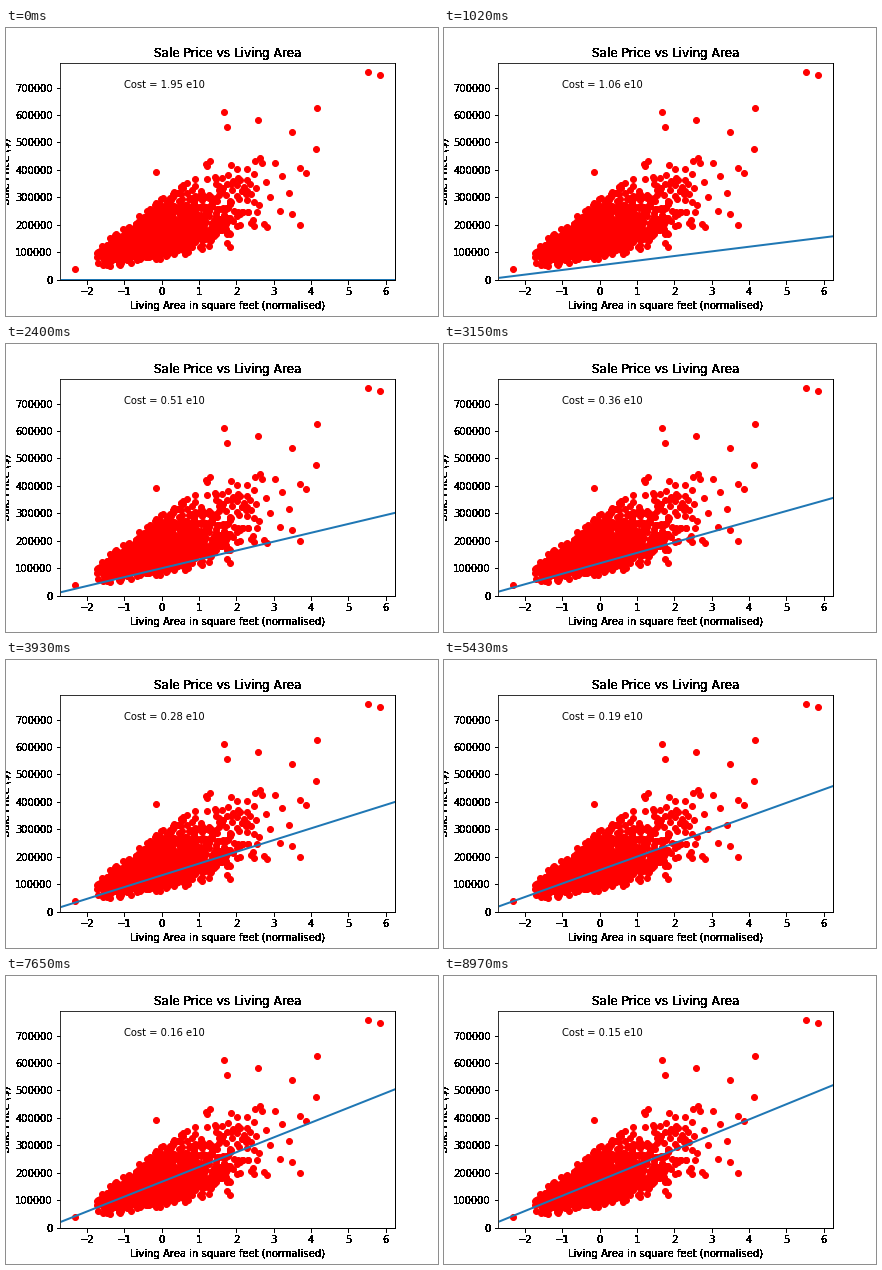
Animation, 432 px wide and 288 px high, one loop 9 s. Source, as a matplotlib script:

```python
import numpy as np
import matplotlib.pyplot as plt
from matplotlib.animation import FuncAnimation

plt.rcParams["font.family"] = "DejaVu Sans"

FRAMES, INTERVAL = 300, 30
RATE = 0.01                                   # gradient descent step
MEAN, SLOPE, SPREAD = 180933, 58430, 79495    # least squares fit of the prices
AREA_MEAN, AREA_STD = 1510.47, 507.88


def padded(low, high, pad=0.05):
    margin = pad * (high - low)
    return low - margin, high + margin


def normalise(area):
    return (area - AREA_MEAN) / AREA_STD


XLIM = padded(normalise(334), normalise(4476))
YLIM = padded(34900, 755000)

# The houses that stand clear of the cloud: normalised area, price
LONERS = [(-2.316, 39e3), (-0.15, 392e3), (1.67, 611e3), (1.75, 556e3),
          (2.58, 582e3), (3.49, 538e3), (3.71, 199e3), (4.14, 476e3),
          (4.16, 625e3), (5.524, 755e3), (5.839, 745e3)]


def houses():
    """A skewed log-normal cloud, a thin tail to its right and the loners."""
    rng = np.random.default_rng(7)
    area = np.exp(rng.normal(7.285, 0.325, 1500))
    noise = rng.normal(0, 1, 1500)
    noise[noise < 0] *= 1.2
    x = normalise(area)
    price = np.exp(12.02 + 0.88 * (np.log(area) - 7.268) + 0.26 * noise)
    keep = (x > -1.8) & (x < 2.45) & (noise > -3.4) & (noise < 2.1 + 0.4 * x)
    keep &= price < 465e3
    cloud = np.column_stack([x, price])[keep]
    u, v = rng.random((2, 20))
    tail = np.column_stack([2.45 + 1.5 * u**2, 190e3 + 260e3 * v])
    return np.vstack([cloud, tail, LONERS]).T


def hard_ink(fig):
    """Render once and make every dark pixel opaque, all others clear."""
    fig.patch.set_alpha(0)
    fig.canvas.draw()
    shot = np.array(fig.canvas.buffer_rgba())
    fig.patch.set_alpha(1)
    dark = (shot[..., 3] > 32) & (shot[..., :3].min(axis=2) < 200)
    shot[..., 3] = np.where(dark, 255, 0)
    return shot


fig = plt.figure(figsize=(6, 4), dpi=72, facecolor="white")
ax = fig.add_axes([0.125, 0.125, 0.775, 0.755])
ax.set(xlim=XLIM, ylim=YLIM, title="Sale Price vs Living Area",
       xlabel="Living Area in square feet (normalised)",
       ylabel="Sale Price ($)")

# The frame and labels are static, without antialiasing
fig.figimage(hard_ink(fig), zorder=5)
ax.set_title("")
ax.set_axis_off()

ax.scatter(*houses(), color="red")
line, = ax.plot([], [], lw=2, color="C0")
label = ax.text(-1, 700000, "", fontsize=10)
ax.set(xlim=XLIM, ylim=YLIM)
span = np.array([-3, 7])


def update(step):
    left = (1 - RATE) ** step
    line.set_data(span, (1 - left) * (MEAN + SLOPE * span))
    cost = ((MEAN**2 + SLOPE**2) * left**2 + SPREAD**2 - SLOPE**2) / 2
    label.set_text(f"Cost = {cost / 1e10:.2f} e10")
    return line, label


anim = FuncAnimation(fig, update, frames=FRAMES, interval=INTERVAL,
                     repeat=True, repeat_delay=0)
plt.show()
```
